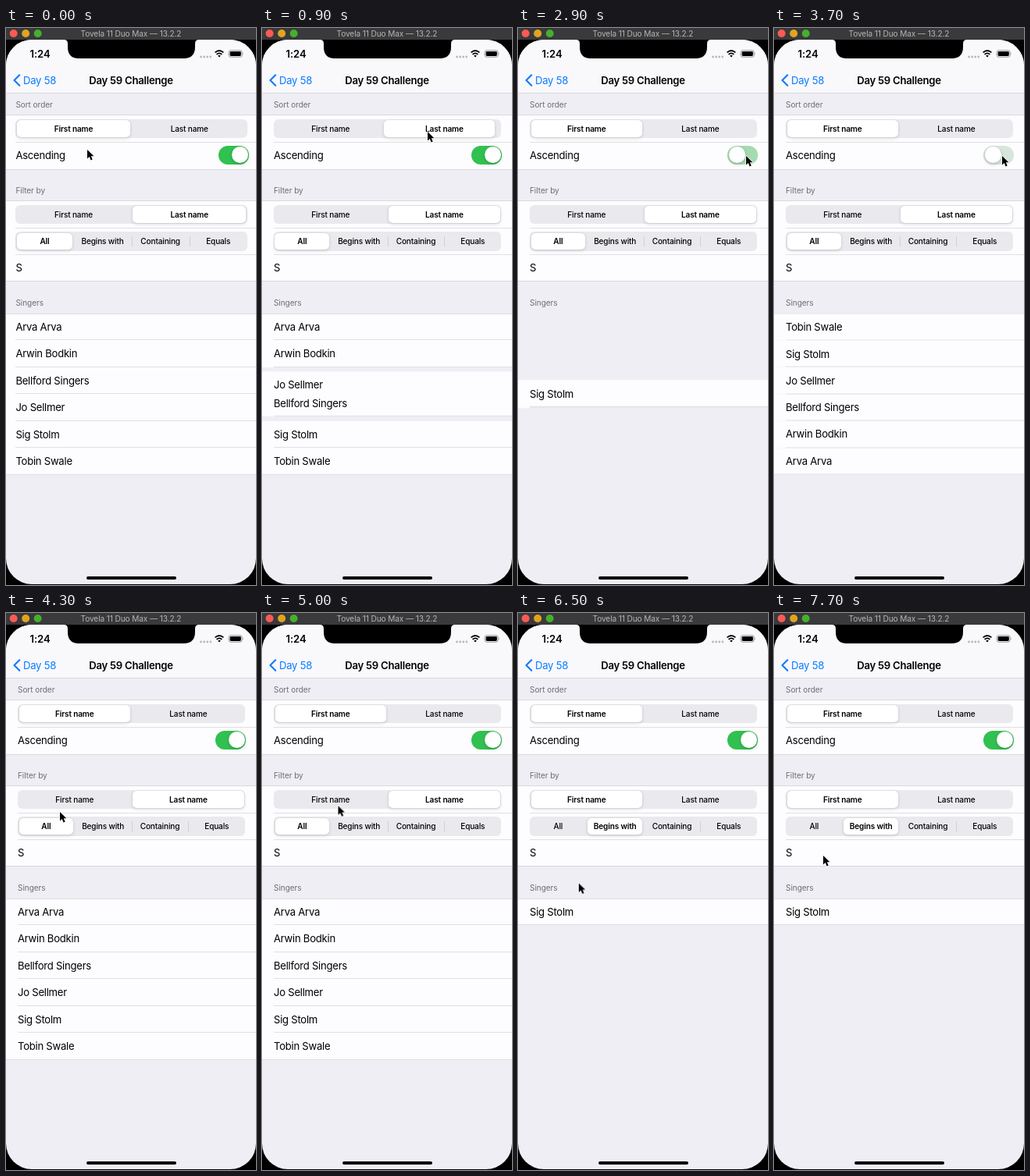
An HTML page that plays this animation: 320 px wide and 714 px high, repeating every 8 s.

```html
<!DOCTYPE html>
<html lang="en">
<head>
<meta charset="utf-8">
<title>Day 59 Challenge</title>
<style>
@property --inset { syntax: "<length>"; inherits: true; initial-value: 15px; }
@property --swap { syntax: "<number>"; inherits: true; initial-value: 0; }
@property --flip { syntax: "<number>"; inherits: true; initial-value: 0; }
@property --cut { syntax: "<number>"; inherits: true; initial-value: 0; }
@property --sort { syntax: "<number>"; inherits: true; initial-value: 0; }
@property --field { syntax: "<number>"; inherits: true; initial-value: 1; }
@property --mode { syntax: "<number>"; inherits: true; initial-value: 0; }
@property --knob { syntax: "<number>"; inherits: true; initial-value: 0; }
@property --fade { syntax: "<number>"; inherits: true; initial-value: 0; }

@keyframes inset { 0%, 7.75% { --inset: 12.4px } 12%, 100% { --inset: 15px } }
@keyframes swap { 0%, 8.125%, 25.625%, 100% { --swap: 0 } 12.5%, 21.25% { --swap: 1 } }
@keyframes flip { 0%, 34.0625%, 50.625%, 100% { --flip: 0 } 38.4375%, 46.25% { --flip: 1 } }
@keyframes cut { 0%, 73.5% { --cut: 0 } 77.875%, 100% { --cut: 1 } }
@keyframes sort { 0%, 7.75%, 26.125%, 100% { --sort: 0 } 13%, 20.875% { --sort: 1 } }
@keyframes field { 0%, 64.375% { --field: 1 } 69.625%, 100% { --field: 0 } }
@keyframes mode { 0%, 73.225% { --mode: 0 } 78.475%, 100% { --mode: 1 } }
@keyframes knob { 0%, 33.6875%, 48.375%, 100% { --knob: 0 } 36.1875%, 45.875% { --knob: 1 } }
@keyframes fade { 0%, 33.6875%, 50%, 100% { --fade: 0 } 37.8125%, 45.875% { --fade: 1 } }
@keyframes front { 0%, 18% { z-index: 3 } 18.1%, 100% { z-index: 1 } }
@keyframes pointer {
  0%, 1% { transform: translate(104px, 156px) }
  6.9%, 12.5% { transform: translate(212px, 133px) }
  16.25%, 28.1% { transform: translate(90px, 128px) }
  32.5%, 48.75% { transform: translate(292px, 164px) }
  53.4%, 54.1% { transform: translate(69px, 255px) }
  56.9% { transform: translate(62px, 286px) }
  60% { transform: translate(125px, 284px) }
  63.5%, 65% { transform: translate(92px, 240px) }
  68.1% { transform: translate(78px, 312px) }
  71.5%, 76% { transform: translate(125px, 277px) }
  82.5%, 84% { transform: translate(74px, 352px) }
  88.6%, 100% { transform: translate(63px, 311px) }
}

html, body { margin: 0; width: 100%; height: 100%; overflow: hidden; background: #000; }
.stage {
  --spring: cubic-bezier(.22, .4, .2, 1);
  --line: #d9d8dd;
  --hairline: #e0dfe4;
  --paper: #fdfcfe;
  position: relative; width: 320px; height: 714px; overflow: hidden; background: #000;
  font: 13.14px/20px Inter, "Open Sans", sans-serif; letter-spacing: -.27px; color: #000;
  white-space: nowrap;
  animation: 8s var(--spring) infinite inset, 8s ease-in-out infinite swap,
    8s ease-in-out infinite flip, 8s ease-in-out infinite cut,
    8s var(--spring) infinite sort, 8s var(--spring) infinite field,
    8s var(--spring) infinite mode, 8s ease-in-out infinite knob, 8s linear infinite fade;
}
.stage div, .stage i, .stage svg { position: absolute; box-sizing: border-box; }
.titlebar {
  inset: 0 0 auto; height: 15px; background: #3a393b; color: #b5b4b6; text-align: center;
  font-size: 10.1px; line-height: 15px; letter-spacing: -.1px;
}
.screen { inset: 0; background: #efeef5; clip-path: inset(15px 0 1px round 33px); }
.nav { inset: 0 0 auto; height: 84px; background: #f9f9fc; border-bottom: 1px solid var(--line); }
.nav div { top: 57px; }
.heading { left: 0; right: 0; text-align: center; font-weight: 600; letter-spacing: -.24px; }
.back { left: 22px; color: #0a7aff; }
.header { left: var(--inset); color: #6d6d72; font-size: 10.05px; letter-spacing: -.06px; }
.group {
  left: 0; right: 0; background: var(--paper);
  border: solid var(--line); border-width: 1px 0;
}
.rule { left: var(--inset); right: 0; height: 1px; background: var(--hairline); }
.label { left: var(--inset); }

.seg {
  left: var(--inset); right: calc(var(--inset) - 1.2px); height: 24.6px;
  border-radius: 6px; background: #eae9ed; font-size: 10.05px; letter-spacing: -.15px;
}
.thumb {
  top: 1.5px; bottom: 1.5px; left: calc(var(--pos) * 100% / var(--n) + 1.5px);
  width: calc(100% / var(--n) - 3px); border-radius: 5px; background: #fff;
  box-shadow: 0 1.5px 4px #0002, 0 0 1px #0003;
}
.seg span {
  position: relative; float: left; width: calc(100% / var(--n)); text-align: center;
  line-height: 24.4px; font-weight: calc(500 + 100 * var(--on, 0));
}
.divider { top: 6px; bottom: 6px; width: 1px; background: #d0cfd4; }

.switch {
  left: calc(268px + (15px - var(--inset)) * 1.35); top: 151px; width: 39.4px; height: 24px;
  border-radius: 12px; background: #e9e9eb;
}
.tint { inset: 0; border-radius: 12px; background: #31c150; opacity: calc(1 - var(--fade)); }
.knob {
  left: calc(17px - 15.4px * var(--knob)); top: 1.4px; width: 21px; height: 21px;
  border-radius: 50%; background: #fff; box-shadow: 0 1.5px 4px #0003;
}

.row {
  --first: 0; --last: 0; --moves: 0; --drop: var(--i);
  left: 0; right: 0; top: calc(365.5px + 34.5px * var(--i)); height: 34.5px;
  line-height: 34.5px; padding-left: var(--inset); background: var(--paper);
  opacity: calc(1 - var(--cut));
  transform: translateY(calc(34.5px * (var(--swap) * var(--moves)
    + var(--flip) * (5 - 2 * var(--i)) - var(--cut) * var(--drop))));
}
.row::before, .row::after { content: ""; position: absolute; right: 0; height: 1px; background: var(--hairline); }
.row::before { left: 0; top: 0; opacity: var(--first); }
.row::after { left: calc(var(--inset) * (1 - var(--last))); bottom: 0; }
.row.swapped { animation: front 8s infinite; }
.row.kept { z-index: 5; opacity: 1; }

.clock { left: 30.5px; top: 23px; font-weight: 600; letter-spacing: -.1px; }
.overlay { inset: 0; z-index: 8; }
.pointer { left: 0; top: 0; z-index: 9; overflow: visible; animation: pointer 8s ease-in-out infinite; }
</style>
</head>
<body>
<div class="stage">
  <div class="titlebar">Tovela 11 Duo Max — 13.2.2</div>

  <div class="screen">
    <div class="nav">
      <div class="back">Day 58</div>
      <div class="heading">Day 59 Challenge</div>
    </div>
    <div class="clock">1:24</div>

    <div class="header" style="top:87.5px">Sort order</div>
    <div class="group" style="top:111px;height:70.5px"></div>
    <div class="seg" style="top:116.5px;--n:2;--pos:var(--sort)">
      <i class="thumb"></i>
      <span style="--on:calc(1 - var(--pos))">First name</span><span style="--on:var(--pos)">Last name</span>
    </div>
    <div class="rule" style="top:146px"></div>
    <div class="label" style="top:153px">Ascending</div>
    <div class="switch"><i class="tint"></i><i class="knob"></i></div>

    <div class="header" style="top:197.5px">Filter by</div>
    <div class="group" style="top:221px;height:104px"></div>
    <div class="seg" style="top:226.5px;--n:2;--pos:var(--field)">
      <i class="thumb"></i>
      <span style="--on:calc(1 - var(--pos))">First name</span><span style="--on:var(--pos)">Last name</span>
    </div>
    <div class="rule" style="top:255.5px"></div>
    <div class="seg" style="top:261px;--n:4;--pos:var(--mode)">
      <i class="divider" style="left:50%;opacity:calc(1 - var(--pos))"></i>
      <i class="divider" style="left:75%"></i>
      <i class="thumb"></i>
      <span style="--on:calc(1 - var(--pos))">All</span><span style="--on:var(--pos)">Begins with</span><span>Containing</span><span>Equals</span>
    </div>
    <div class="rule" style="top:290px"></div>
    <div class="label" style="top:297px">S</div>

    <div class="header" style="top:341.5px">Singers</div>
    <div class="row" style="--i:0;--first:calc(1 - var(--flip));--last:var(--flip)">Arva Arva</div>
    <div class="row" style="--i:1">Arwin Bodkin</div>
    <div class="row swapped" style="--i:2;--moves:1">Bellford Singers</div>
    <div class="row" style="--i:3;--moves:-1;z-index:2">Jo Sellmer</div>
    <div class="row kept" style="--i:4;--first:var(--cut);--last:var(--cut)">Sig Stolm</div>
    <div class="row" style="--i:5;--drop:4;--first:var(--flip);--last:calc(1 - var(--flip))">Tobin Swale</div>
  </div>

  <svg class="overlay" width="320" height="714">
    <circle cx="9.7" cy="7" r="5" fill="#fc5b53"/>
    <circle cx="25.2" cy="7" r="5" fill="#e0a520"/>
    <circle cx="40.7" cy="7" r="5" fill="#45b02c"/>
    <path d="M74 15Q79 15 79 20V24Q79 39 93 39H227.5Q242 39 242 24V20Q242 15 247 15Z"/>
    <path d="M17.3 60.3 10.5 67l6.8 6.8" fill="none" stroke="#0a7aff" stroke-width="2.1" stroke-linecap="round" stroke-linejoin="round"/>
    <path d="M249.5 37H263" stroke="#b9b8bd" stroke-width="2.8" stroke-linecap="round" stroke-dasharray="0 4.1"/>
    <g fill="none" stroke="#000" stroke-width="1.8">
      <path d="M267.6 31.4Q273 26.6 278.4 31.4M269.6 33.9Q273 30.8 276.4 33.9"/>
      <path d="M271.2 35.4Q273 34 274.8 35.4L273 37.4Z" fill="#000" stroke="none"/>
      <rect x="285.2" y="28.7" width="17" height="8.6" rx="2.4" stroke="#8b8b8e" stroke-width=".9"/>
    </g>
    <rect x="286.6" y="30.1" width="14.2" height="5.8" rx="1.3"/>
    <path d="M303.3 31.6q1.4 1.4 0 2.8z" fill="#8b8b8e"/>
    <rect x="103" y="703.1" width="115" height="3.8" rx="1.9"/>
  </svg>

  <svg class="pointer" width="10" height="15">
    <path d="M0 0V11.6L2.7 9.1 4.6 13.5 6.7 12.6 4.8 8.3H8.4Z" stroke="#fff" stroke-width="1.4" stroke-linejoin="round" paint-order="stroke"/>
  </svg>
</div>
</body>
</html>
```
